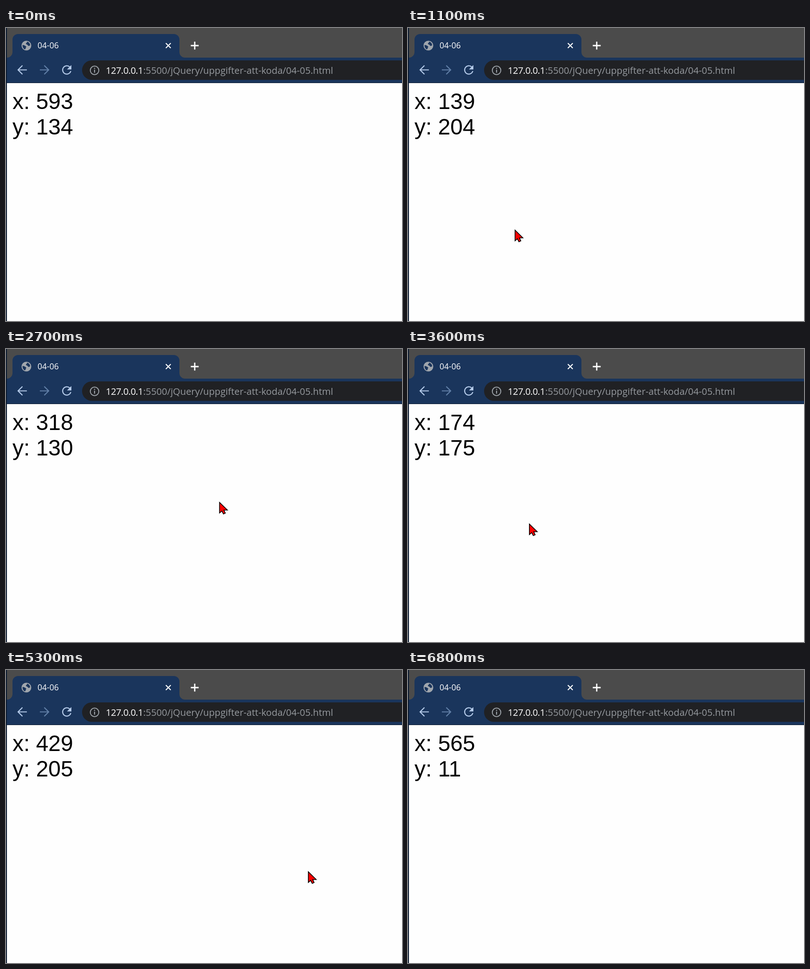
An HTML page that plays this animation: 854x633 px, repeating every 7500 ms.

```html
<!DOCTYPE html>
<html lang="sv">
<head>
<meta charset="utf-8">
<title>04-06</title>
<style>
  html, body { margin: 0; width: 100%; height: 100%; overflow: hidden; background: #fefefe; }
  svg { display: block; }
  .ui { font-family: "Open Sans", "Noto Sans", sans-serif; }
  .page { font: 48px "Liberation Sans", Arial, sans-serif; }
  .line { fill: none; stroke-width: 2.2; }
</style>
</head>
<body>
<svg width="854" height="633" viewBox="0 0 854 633">
  <rect width="854" height="633" fill="#fefefe"/>

  <rect width="854" height="64" fill="#4b4b4b"/>
  <rect y="64" width="854" height="54" fill="#1a355c"/>
  <path d="M2 64a12 12 0 0 0 12-12V25a12 12 0 0 1 12-12H362a12 12 0 0 1 12 12V52a12 12 0 0 0 12 12Z" fill="#1a355c"/>
  <rect y="118" width="854" height="1" fill="#0c1a2f"/>
  <rect width="2" height="633" fill="#0a1a30"/>

  <circle cx="44" cy="38" r="10.5" fill="#a0a6ad"/>
  <path d="M35.8 36.5C39 37 42 38 44 40.5C42 42 43.5 44 41 46C38 45.5 35 41 35.8 36.5ZM45 29.6C49 30 51.5 33 52.2 37C49.5 40 47 38.5 46.5 36.2C44 36 42.5 34.5 43 32.6C45 32.8 45.5 31.5 45 29.6Z" fill="#1a355c"/>
  <text class="ui" x="68" y="44" font-size="17.5" fill="#fff">04-06</text>
  <path class="line" d="M344.7 32.7l10.6 10.6m0-10.6l-10.6 10.6" stroke="#fff"/>
  <path d="M398.5 38h17M407 29.5v17" stroke="#fff" stroke-width="2.8"/>

  <path class="line" d="M45 90.5H26.5M35.5 81l-9.5 9.5 9.5 9.5" stroke="#b5cbea"/>
  <path class="line" d="M73 90.5H91.5M82.5 81l9.5 9.5-9.5 9.5" stroke="#6280a8"/>
  <path class="line" d="M137.6 84.3A9 9 0 1 0 139.8 93" stroke="#b5cbea"/>
  <path d="M141 80v9.5h-9.5Z" fill="#b5cbea"/>

  <path d="M860 70H185a21 21 0 0 0 0 42H860Z" fill="#202124"/>
  <circle cx="191" cy="91.5" r="9.2" fill="none" stroke="#9aa0a6" stroke-width="2"/>
  <path d="M191 90v6.5M191 86v2.2" stroke="#9aa0a6" stroke-width="2.2"/>
  <g class="ui">
    <text x="215.3" y="98.5" font-size="20" fill="#fff" letter-spacing="-.5">127.0.0.1</text>
    <text x="296" y="98.5" font-size="20.2" fill="#969a9f">:5500/jQuery/uppgifter-att-koda/04-05.html</text>
  </g>

  <g class="page">
    <text id="tx" x="14" y="175"></text>
    <text id="ty" x="14" y="230"></text>
  </g>
  <path id="cursor" d="M1 2V25L6 20.6 9.4 27.2 13.5 25.2 10.4 18.7H18Z" fill="#f00" stroke="#000" stroke-width="1.6"/>
</svg>
<script>
const LOOP = 7500, STEP = 100, LAG = 0.35;
const PAGE = { left: 2, top: 120, right: 854, zoom: 1.5 };

// A sweep of the pointer: key points spread evenly over its time.
const sweep = (start, end, keys) => ({
  start, end, keys: keys.split(" ").map(k => k.split(",").map(Number))
});

const sweeps = [
  sweep(0, 1600, "1045,-35 551,167 333,210 176,296 159,386 175,411 304,458 475,479 577,464"),
  sweep(2000, 3000, "577,464 617,312 597,258 516,290 397,368 268,395"),
  sweep(3500, 3900, "268,395 250,340 222,203"),
  sweep(4200, 4500, "222,203 341,191 440,188 495,187"),
  sweep(4700, 5100, "495,187 508,345 530,370"),
  sweep(5100, 5300, "530,370 636,417 651,434"),
  sweep(5300, 5900, "651,434 697,506 766,537 762,537"),
  sweep(6100, 6200, "762,537 762,535"),
  sweep(6400, 7000, "762,535 820,316 855,100 900,-60")
];

const spline = (a, b, c, d, u) =>
  b + u / 2 * (c - a + u * (2 * a - 5 * b + 4 * c - d + u * (3 * (b - c) + d - a)));

function pointer(t) {
  const { start, end, keys } = sweeps.filter(s => s.start <= t).pop() || sweeps[0];
  const last = keys.length - 1;
  const pos = Math.min(1, Math.max(0, (t - start) / (end - start))) * last;
  const i = Math.min(Math.floor(pos), last - 1);
  const key = n => keys[Math.min(last, Math.max(0, n))];
  return [0, 1].map(k => spline(key(i - 1)[k], key(i)[k], key(i + 1)[k], key(i + 2)[k], pos - i));
}

// The readout trails a moving pointer and keeps its value while the pointer is off the page.
const poses = [];
let read = [593, 134];
for (let t = 0; t < LOOP; t += STEP) {
  const tip = pointer(t), prev = pointer(t - STEP);
  const resting = String(pointer(t + STEP)) === String(tip);
  const [x, y] = resting ? tip : tip.map((v, k) => v + (prev[k] - v) * LAG);
  if (x < PAGE.right && y >= PAGE.top)
    read = [x - PAGE.left, y - PAGE.top].map(v => Math.round(v / PAGE.zoom));
  poses.push({ tip, read });
}

const el = id => document.getElementById(id);
const tx = el("tx"), ty = el("ty"), cursor = el("cursor");

function draw(ms) {
  const { tip, read } = poses[Math.floor(ms % LOOP / STEP)];
  tx.textContent = "x: " + read[0];
  ty.textContent = "y: " + read[1];
  cursor.setAttribute("transform", `translate(${tip})`);
}

const begin = performance.now();
function tick() {
  draw(Math.max(0, performance.now() - begin));
  requestAnimationFrame(tick);
}
tick();
</script>
</body>
</html>
```
